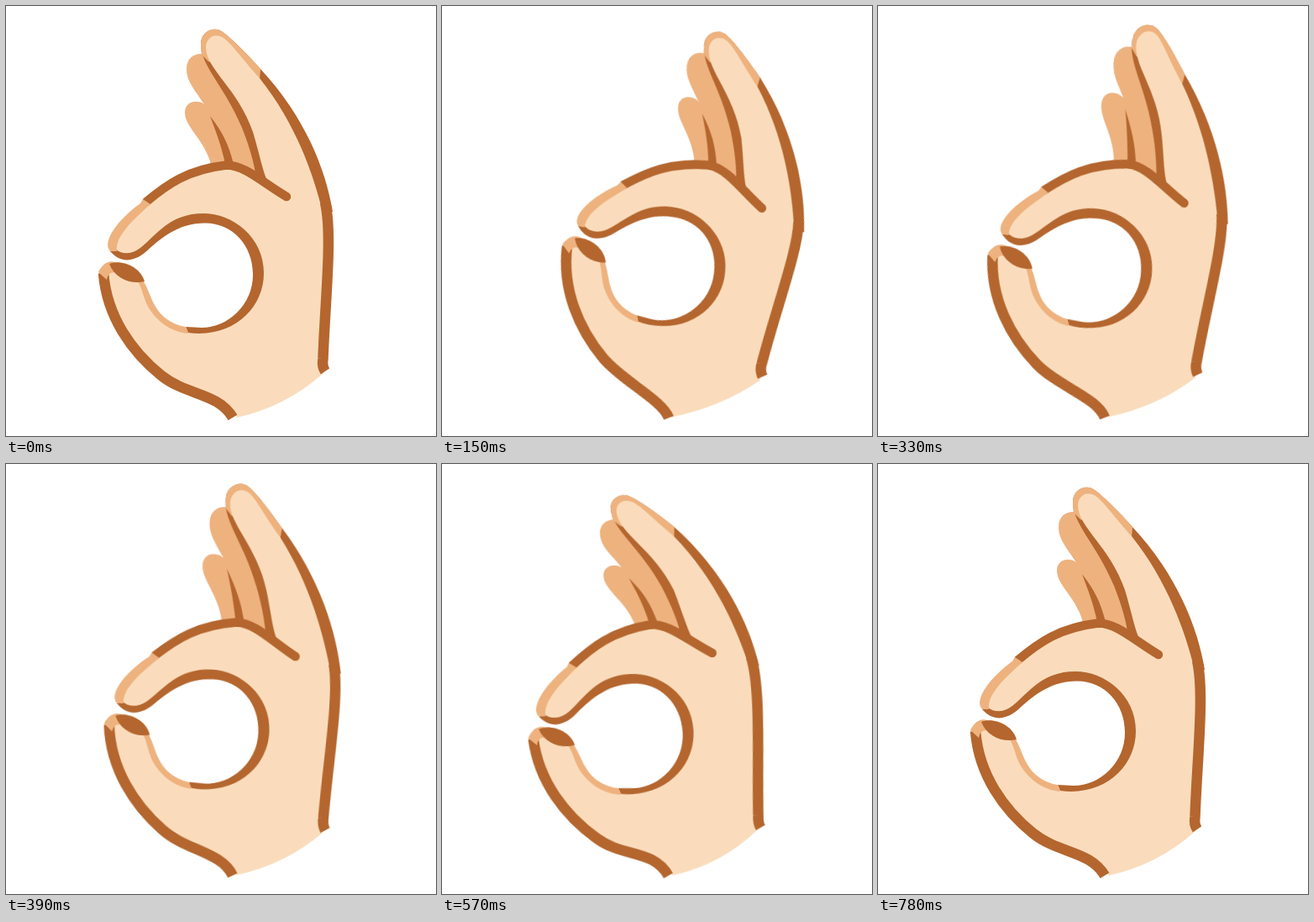
Animation of 512x512 px, one loop 1050 ms. Source, as an HTML page without scripts:

```html
<!DOCTYPE html>
<html lang="en">
<head>
<meta charset="utf-8">
<title>OK hand</title>
<style>
  html, body { margin: 0; width: 100%; height: 100%; overflow: hidden; background: #fff; }
  svg { display: block; width: 100%; height: 100%; }

  .cream { fill: #fadcbc; }
  .peach { fill: #eeb27e; }
  .brown { fill: #b4662e; }
  .line { fill: none; stroke: #b4662e; stroke-width: 10.5; }

  .hand, .bend, .wrist {
    animation: 1050ms cubic-bezier(.37, 0, .63, 1) infinite;
  }
  .hand { transform-origin: 290px 464px; animation-name: swing; }
  .bend { animation-name: bend; }
  .wrist { animation-name: wrist; }

  @keyframes swing {
    0%, 74.3%, 100% { transform: rotate(0deg); }
    16.2%, 21.4% { transform: rotate(12deg); }
    49% { transform: rotate(-3.3deg); }
  }
  /* fingers trail behind the swing */
  @keyframes bend {
    0%, 74.3%, 100% { d: var(--rest); }
    5.7%, 49% { d: var(--curl); }
    32.4% { d: var(--open); }
  }
  /* keeps the cut of the wrist in place */
  @keyframes wrist {
    0%, 74.3%, 100% { d: var(--rest); }
    16.2%, 21.4% { d: var(--right); }
    49% { d: var(--left); }
  }

  #back {
    --rest: path("M245 192C238 160 213 145 213 127C213 113 228 111 236 117C225 100 215 90 215 75C215 62 224 56 234 57L275 100L293 150L305 205Z");
    --curl: path("M245 192C236 161 210 147 209 130C208 117 223 114 231 120C219 104 208 95 207 81C206 69 214 63 224 63L270 101L290 151L305 205Z");
    --open: path("M245 192C242 158 220 140 221 121C222 106 237 105 246 112C237 96 228 84 229 68C230 55 240 49 250 51L282 98L295 149L305 205Z");
  }
  #split {
    --rest: path("M243 131C250 150 256 165 261 188L271 188C265 165 258 150 243 131Z");
    --curl: path("M239 133C248 151 255 165 261 188L271 188C264 165 256 151 239 133Z");
    --open: path("M250 125C255 148 258 165 261 188L271 188C267 165 261 149 250 125Z");
  }
  #edge {
    --rest: path("M389 245C381 195 356 132 303 75C290 60 268 38 258 31C247 23 232 31 232 45C232 72 260 95 281 145C291 170 296 190 298 205L340 245Z");
    --curl: path("M389 245C380 195 353 131 296 75C281 62 256 42 245 37C234 30 219 39 221 52C224 77 254 97 278 146C289 170 296 190 298 205L340 245Z");
    --open: path("M389 245C382 195 360 133 315 75C303 58 286 34 276 26C266 17 250 24 248 39C244 67 269 92 285 145C293 170 296 190 298 205L340 245Z");
  }
  #tip {
    --rest: path("M303 75C290 60 268 38 258 31C247 23 232 31 232 45C232 50 232 54 233 58L241 66L302 88Z");
    --curl: path("M296 75C281 62 256 42 245 37C234 30 219 39 221 52C222 56 222 60 223 64L232 71L295 88Z");
    --open: path("M315 75C303 58 286 34 276 26C266 17 250 24 248 39C248 44 248 48 248 52L255 61L313 88Z");
  }
  #front {
    --rest: path("M377 245C366 200 345 140 302 86C282 64 268 44 259 38C248 31 238 38 238 50C239 76 276 98 294 150C303 180 305 195 312 210L330 245Z");
    --curl: path("M377 245C365 200 342 139 295 86C273 66 257 48 247 43C235 38 226 45 228 56C231 81 270 100 292 150C302 180 305 195 312 210L330 245Z");
    --open: path("M377 245C367 200 349 141 313 86C295 62 284 40 276 33C266 25 255 32 253 44C251 71 285 96 297 150C304 180 305 195 312 210L330 245Z");
  }
  #heel {
    --rest: path("M118 324C121 372 150 412 185 440C215 464 252 460 275 490Q333 477 377 438L381 243L335 225L310 400L190 400Z");
    --right: path("M118 324C121 372 150 412 185 440C213 462 264 475 280 492Q335 468 373 428L381 243L335 225L310 400L190 400Z");
    --left: path("M118 324C121 372 150 412 185 440C215 465 252 456 273 489Q332 479 376 441L381 243L335 225L310 400L190 400Z");
  }
  #sides {
    stroke-width: 12.5px;
    --rest: path("M116 318C120 370 150 412 185 440C215 464 252 460 270 490M380 234C389 272 380 350 377.5 420Q376 429 380 435");
    --right: path("M116 318C120 370 150 412 185 440C213 462 264 475 276 494M380 234C386 268 375 335 371 408Q370 416 375 423");
    --left: path("M116 318C120 370 150 412 185 440C215 465 252 456 268 489M380 234C390 274 381 353 379 423Q378 432 381 438");
  }
</style>
</head>
<body>
<svg viewBox="0 0 512 512">
  <g class="hand">
    <path id="back" class="peach bend"/>
    <path id="split" class="brown bend"/>
    <path id="edge" class="brown bend"/>
    <path id="tip" class="peach bend"/>
    <path id="front" class="cream bend"/>

    <path id="heel" class="cream wrist"/>
    <path class="cream" d="M117 325C117 310 130 308 140 310C152 313 158 322 162 330C168 342 171 358 186 372C200 384 228 388 243 386C277 382 297 350 297 320C297 283 270 256 237 256C203 256 183 275 163 292C152 301 137 300 130 294C120 286 127 268 144 252C180 218 215 194 262 189C290 190 310 212 334 225L380 245L378 330L300 440L185 438C145 405 122 365 117 325Z"/>
    <path id="sides" class="line wrist"/>

    <path class="line" d="M166 234C192 212 216 195 262 189.500C285 189.500 305 210 334 227"/>
    <circle class="brown" cx="334" cy="227" r="5.200"/>
    <path class="brown" d="M124 292C137 307 152 304 165 294C185 276 205 258.500 237 258.500C270 258.500 294 285 294 320C294 356 264 383 233 383L214 382L217 389C270 396 307 360 307 318C307 275 270 247 235 247C195 247 180 272 160 288C150 296 138 296 131 290Z"/>
    <path class="peach" d="M160 235C136 252 113 280 124 292L132 292C130 274 151 255 172 236L163 230Z"/>
    <path class="peach" d="M164 328C172 342 174 358 189 371Q200 380 214 382L217 390C196 388 182 376 173 364C163 350 164 340 157 328Z"/>
    <path class="peach" d="M110 317C114 308 122 302 130 305L130 317C124 317 121 320 120 326Z"/>
    <path class="brown" d="M123 307C137 301 160 310 165 328C149 332 130 325 123 307Z"/>
  </g>
</svg>
</body>
</html>
```
